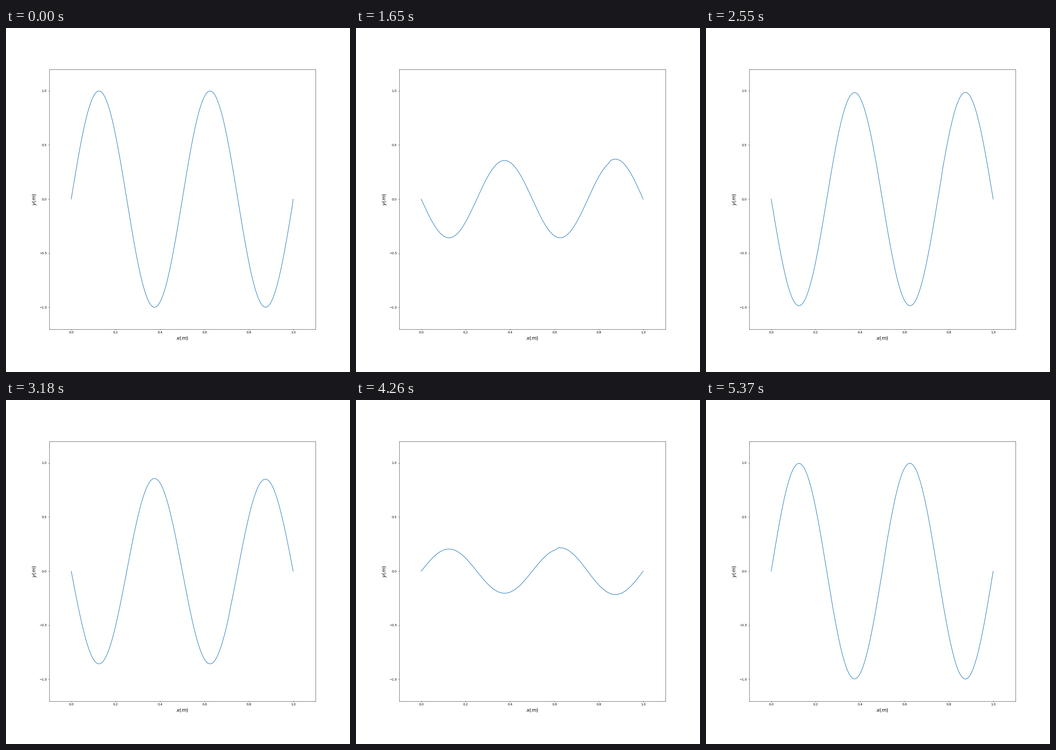
Recreate the animation shown at these times as a matplotlib script. Size 748 by 748 pixels, loop 5.4 s.

```python
import numpy as np
import matplotlib.pyplot as plt
from matplotlib.animation import FuncAnimation

SIZE = 748          # stage in pixels
INCHES = 15
FRAMES = 180
INTERVAL = 30       # ms
DX = 0.003
COURANT = 10 / 11   # c * dt / dx


def solve(x):
    """Explicit wave equation with fixed ends, starting at rest."""
    prev = np.sin(4 * np.pi * x)
    cur = prev.copy()
    rows = []
    for _ in range(FRAMES):
        new = np.zeros_like(cur)
        bend = cur[2:] - 2 * cur[1:-1] + cur[:-2]
        new[1:-1] = 2 * cur[1:-1] - prev[1:-1] + COURANT**2 * bend
        prev, cur = cur, new
        rows.append(new)
    return rows


x = DX * np.arange(334)
waves = solve(x)

fig = plt.figure(figsize=(INCHES, INCHES), dpi=SIZE / INCHES, facecolor="white")
ax = fig.add_axes([0.125, 0.125, 0.775, 0.755])
ax.set_xlim(-0.1, 1.1)
ax.set_ylim(-1.2, 1.2)
ax.set_xticks(np.linspace(0, 1, 6))
ax.set_yticks(np.linspace(-1, 1, 5))
ax.set_xlabel("$x(m)$", fontsize=16)
ax.set_ylabel("$y(m)$", fontsize=16)
line, = ax.plot(x, waves[0], color="#1f77b4", lw=1.5)


def update(i):
    line.set_ydata(waves[i])
    return line,


anim = FuncAnimation(fig, update, frames=FRAMES, interval=INTERVAL,
                     repeat=True, repeat_delay=0)
plt.show()
```
